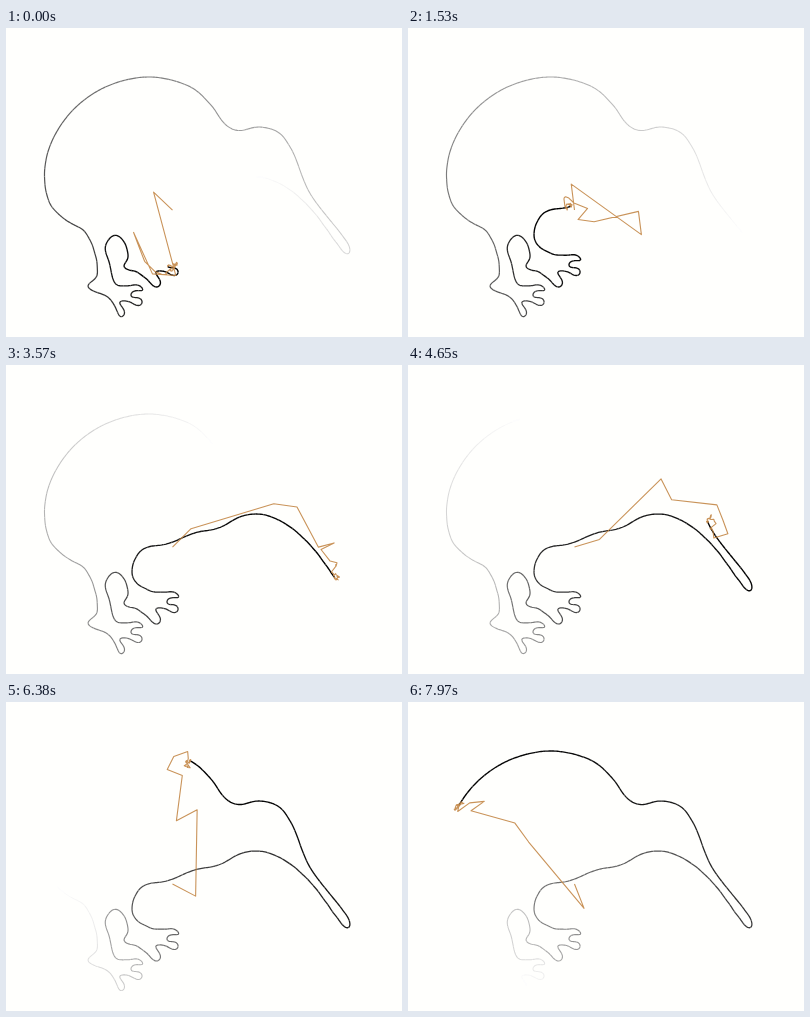
Write an HTML page with a canvas that moves like this. It is 396x309 px and loops after 8000 ms.

```html
<!DOCTYPE html>
<html lang="en">
<head>
<meta charset="utf-8">
<title>Fourier kiwi</title>
<style>
html, body { margin: 0; width: 100%; height: 100%; overflow: hidden; background: #fffffd; }
canvas { display: block; }
</style>
</head>
<body>
<canvas id="stage" width="396" height="309"></canvas>
<script>
const LOOP = 8000;       // ms shown before the cut back to the start
const PERIOD = 14;       // seconds for one full outline
const BODY_TIME = 8.86;  // seconds of it from chest to heel
const LEAD = 1.25;       // seconds until the pen first reaches the chest
const FADE = 11.5;       // seconds until the trail has vanished
const SAMPLES = 1000;
const HARMONICS = 80;
const TAU = Math.PI * 2;

const points = text => text.split(" ").map(p => p.split(",").map(Number));

// Both feet share three toes, placed by the tip of the first one.
const toes = points("0,0 3,-5 -2,-16 6,-16 19,-12 20,-18 9,-21.5 12,-26 22,-27.5 17,-32 -5,-33");
const foot = (x, y) => toes.map(p => [p[0] + x, p[1] + y]);

const belly = points("136,184 162,178 188,167.5 212,162.5 236,150.5 256,149 280,159 305,181");
const beak = points("337,223 342,226 343,219 303,164");
const back = points("285,121 272,104 253,98.5 231,102 219,96 204,76 184,58.5 143,48.5 100,58 66,82 44,116 38,148");
const rump = points("44,176 60,192 78,203 89,227 90,248 81,258");
const leg = points("103,235 99,217 109,206.5 119,216 121,231 117,238 133,245");
const chest = points("128,215 126,201");

const body = [...belly, ...beak, ...back, ...rump, [103, 270]];
const knots = [...body, ...foot(115, 289), ...leg, ...foot(151, 259), ...chest];
const knot = i => knots[(i + knots.length) % knots.length];

const mix = (a, b, u) => [a[0] + (b[0] - a[0]) * u, a[1] + (b[1] - a[1]) * u];
const dist = (a, b) => Math.hypot(a[0] - b[0], a[1] - b[1]);

// Centripetal Catmull-Rom between knots i and i + 1.
function spline(i, u) {
  const p = [-1, 0, 1, 2].map(d => knot(i + d));
  const t = [0];
  for (let k = 0; k < 3; k++) t.push(t[k] + Math.sqrt(dist(p[k], p[k + 1])));
  const x = t[1] + (t[2] - t[1]) * u;
  const blend = (a, b, j, k) => mix(a, b, (x - t[j]) / (t[k] - t[j]));
  const a = blend(p[0], p[1], 0, 1), b = blend(p[1], p[2], 1, 2), c = blend(p[2], p[3], 2, 3);
  return blend(blend(a, b, 0, 2), blend(b, c, 1, 3), 1, 2);
}

// `count` evenly spaced points along the spline from one knot to another.
function evenly(from, to, count) {
  const steps = 24, fine = [], length = [0];
  for (let i = 0; i <= (to - from) * steps; i++) {
    fine.push(spline(from + Math.floor(i / steps), (i % steps) / steps));
    if (i) length.push(length[i - 1] + dist(fine[i - 1], fine[i]));
  }
  const total = length[length.length - 1];
  let i = 0;
  return Array.from({ length: count }, (_, n) => {
    const goal = total * n / count;
    while (length[i + 1] < goal) i++;
    return mix(fine[i], fine[i + 1], (goal - length[i]) / (length[i + 1] - length[i]));
  });
}

const bodySamples = Math.round(SAMPLES * BODY_TIME / PERIOD);
const heel = body.length - 1;
const samples = [
  ...evenly(0, heel, bodySamples),
  ...evenly(heel, knots.length, SAMPLES - bodySamples)
];

function coefficient(freq) {
  let re = 0, im = 0;
  samples.forEach(([x, y], i) => {
    const a = -TAU * freq * i / SAMPLES, c = Math.cos(a), s = Math.sin(a);
    re += x * c - y * s;
    im += x * s + y * c;
  });
  return { freq, re: re / SAMPLES, im: im / SAMPLES };
}

const center = coefficient(0);
const arms = [];
for (let k = 1; k <= HARMONICS; k++) arms.push(coefficient(k), coefficient(-k));

function joints(phase) {
  let x = center.re, y = center.im;
  const list = [[x, y]];
  for (const { freq, re, im } of arms) {
    const a = TAU * freq * phase, c = Math.cos(a), s = Math.sin(a);
    x += re * c - im * s;
    y += re * s + im * c;
    list.push([x, y]);
  }
  return list;
}

const curve = samples.map((_, i) => joints(i / SAMPLES).pop());
const ctx = document.getElementById("stage").getContext("2d");
ctx.lineJoin = "round";

function polyline(line, color, width) {
  ctx.beginPath();
  line.forEach(p => ctx.lineTo(p[0] + 0.5, p[1] + 0.5));
  ctx.strokeStyle = color;
  ctx.lineWidth = width;
  ctx.stroke();
}

function drawTrail(head, tip) {
  const last = Math.floor(head), chunk = 6;
  const count = Math.floor(FADE / PERIOD * SAMPLES);
  const at = i => curve[(i + SAMPLES) % SAMPLES];
  for (let age = count; age >= 0; age -= chunk) {
    const line = [];
    for (let k = age; k >= Math.max(0, age - chunk); k--) line.push(at(last - k));
    if (age <= chunk) line.push(tip);
    const u = age / count;
    const light = Math.round(253 * u ** 1.5);
    polyline(line, `rgb(${light},${light},${light})`, 1.4 - 0.4 * u);
  }
}

function draw(ms) {
  const phase = ((ms % LOOP) / 1000 - LEAD + PERIOD) / PERIOD % 1;
  const chain = joints(phase);
  ctx.fillStyle = "#fffffd";
  ctx.fillRect(0, 0, 396, 309);
  drawTrail(phase * SAMPLES, chain[chain.length - 1]);
  polyline(chain, "rgba(196,136,72,0.9)", 1.1);
}

const start = performance.now();
function tick() {
  draw(performance.now() - start);
  requestAnimationFrame(tick);
}
tick();
</script>
</body>
</html>
```
